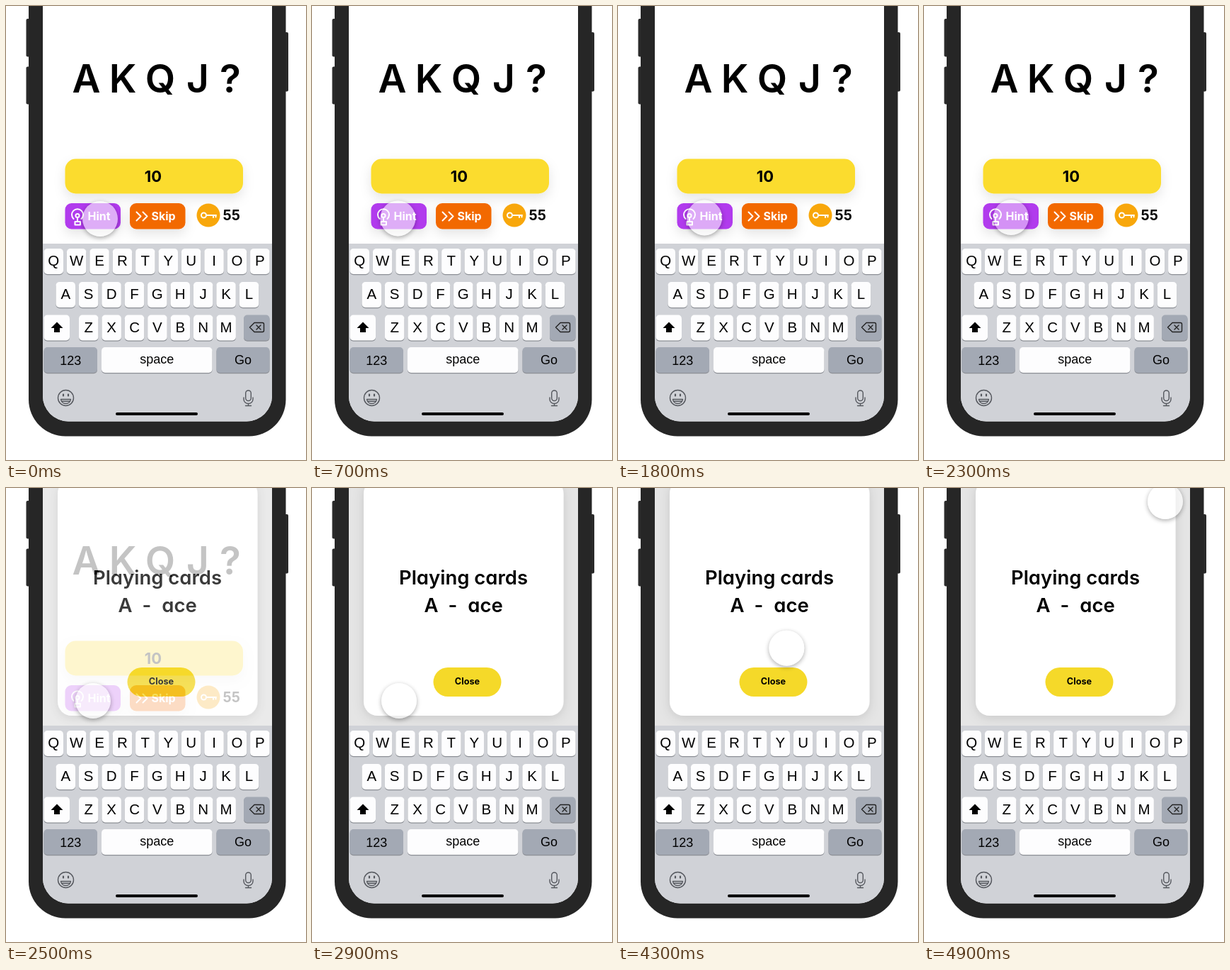
These frames come from a looping animation (424x640 px, 5 s). An HTML page:

```html
<!DOCTYPE html>
<html lang="en">
<head>
<meta charset="utf-8">
<title>Word puzzle hint</title>
<style>
html, body { margin: 0; width: 100%; height: 100%; overflow: hidden; background: #fff; }
#stage { position: absolute; left: 0; top: 0; width: 424px; height: 640px; overflow: hidden; }
svg { display: block; }
text { font-family: Inter, Lato, sans-serif; font-weight: 700; font-feature-settings: "cv11"; text-anchor: middle; }
.title text { font-size: 55px; font-weight: 600; }
.clue text { font-size: 27.5px; font-weight: 600; }
.label { fill: #fff; font-size: 16px; }
.icon { fill: none; stroke: #fff; stroke-width: 2; stroke-linecap: round; stroke-linejoin: round; }
.keys text { font-family: "Liberation Sans", Arial, sans-serif; font-weight: 400; font-size: 20.5px; }
.keys .word { font-size: 18px; }
.line { fill: none; stroke: #55585e; stroke-width: 1.4; stroke-linecap: round; stroke-linejoin: round; }
#touch {
  position: absolute; left: -25px; top: -25px; width: 50px; height: 50px; border-radius: 50%;
  box-shadow: 0 2px 6px rgba(0, 0, 0, .32);
}
</style>
</head>
<body>
<div id="stage">
<svg width="424" height="640" viewBox="0 0 424 640">
  <defs>
    <clipPath id="screen"><rect x="52" y="-60" width="324" height="645.5" rx="36"/></clipPath>
    <clipPath id="upper"><rect x="52" y="0" width="324" height="335"/></clipPath>
    <filter id="soft" x="-20%" y="-60%" width="140%" height="260%">
      <feDropShadow dx="0" dy="7" stdDeviation="8" flood-color="#000" flood-opacity=".1"/>
    </filter>
    <filter id="lift" x="-20%" y="-20%" width="140%" height="140%">
      <feDropShadow dx="0" dy="3" stdDeviation="8" flood-color="#000" flood-opacity=".13"/>
    </filter>
  </defs>

  <g fill="#2a2a2a">
    <rect x="28.5" y="18" width="8" height="53.5" rx="2"/>
    <rect x="28.5" y="85.5" width="8" height="53" rx="2"/>
    <rect x="390" y="37" width="9" height="83.5" rx="2"/>
  </g>
  <rect x="32" y="-80" width="363.5" height="686.5" rx="52" fill="#262626"/>

  <g clip-path="url(#screen)">
    <rect x="52" y="0" width="324" height="586" fill="#fff"/>
    <g class="title">
      <text x="113.5" y="122">A</text><text x="165" y="122">K</text>
      <text x="218" y="122">Q</text><text x="271" y="122">J</text>
      <text x="317" y="122">?</text>
    </g>

    <rect x="83.5" y="215.5" width="251.5" height="49" rx="15" fill="#fbdc2e" filter="url(#soft)"/>
    <text x="208" y="247.5" font-size="22">10</text>

    <g filter="url(#soft)">
      <rect x="83.5" y="278" width="78.5" height="36.5" rx="9" fill="#b13aed"/>
      <rect x="175" y="278" width="78.5" height="36.5" rx="9" fill="#f26904"/>
    </g>
    <g class="icon">
      <path d="M95.5 300A8 8 0 1 1 106.5 300"/>
      <circle cx="101" cy="295.5" r="2.6"/>
      <path d="M101 298.500V303M97.500 304h7.500v4.500h-7.500z"/>
      <path d="M184.500 290.500l6 6-6 6M193.500 290.500l6 6-6 6"/>
    </g>
    <text class="label" x="131.500" y="302">Hint</text>
    <text class="label" x="222.500" y="302">Skip</text>
    <circle cx="286" cy="295" r="16.500" fill="#f8a70b"/>
    <g class="icon">
      <circle cx="279.500" cy="295" r="3.500"/>
      <path d="M283.500 295H297M293 295.500v2.500M296.500 295.500v2"/>
    </g>
    <text x="318.700" y="302" font-size="19.500">55</text>

    <g id="popup" clip-path="url(#upper)" opacity="0">
      <rect x="52" y="0" width="324" height="335" fill="#e5e5e5"/>
      <rect x="73" y="-12" width="282.500" height="333" rx="20" fill="#fff" filter="url(#lift)"/>
      <g class="clue">
        <text x="214" y="136">Playing cards</text>
        <text x="168.500" y="175">A</text><text x="199" y="175">-</text><text x="245" y="175">ace</text>
      </g>
      <rect x="171.500" y="253" width="96" height="41" rx="20.500" fill="#f5d929"/>
      <text x="219.500" y="277" font-size="12.700">Close</text>
    </g>

    <rect x="52" y="335" width="324" height="251" fill="#d0d2d7"/>
    <g class="keys" id="keys"></g>
    <path d="M72 445.500l8.500 8.500h-4.500v6h-8v-6h-4.500z"/>
    <g class="line" style="stroke:#222">
      <path d="M351 446.500h11.500q2 0 2 2v9q0 2-2 2H351l-6.500-6.500zM354 450l6 6M360 450l-6 6"/>
    </g>
    <g class="line">
      <circle cx="84.500" cy="552.500" r="11"/>
      <path d="M77.500 554.500h14q-1 6-7 6t-7-6zM79 557.200h11"/>
      <path d="M81 547.500v2M88 547.500v2" stroke-width="2.200"/>
      <rect x="338.700" y="542" width="7.600" height="14.500" rx="3.800"/>
      <path d="M336 552v2.500a6.500 6 0 0 0 13 0V552M342.500 560.500v3M338.500 563.500h8"/>
    </g>
    <rect x="155" y="573" width="116" height="4" rx="2"/>
  </g>
</svg>
<div id="touch"></div>
</div>

<script>
const LOOP = 5000, STEP = 100;
const WHITE = '#fdfdfe', GREY = '#a3a9b4';

// time, x, y, opacity
const touchPath = [
  [0, 133, 300, .58], [300, 125, 300, .58], [600, 121.500, 299.500, .58],
  [1200, 121, 299, .58], [2200, 123, 298, .56], [2300, 123, 298, .44],
  [2500, 123, 300, .58], [3500, 123, 300, .6], [3600, 125, 299.500, .62],
  [3700, 133, 297.500, .64], [3800, 146, 293, .65], [3950, 173, 283, .65],
  [4100, 202, 266, .65], [4250, 230, 238, .65], [4400, 255, 201, .65],
  [4550, 278, 155, .65], [4700, 302, 101, .65], [4800, 319, 60, .65],
  [4900, 341, 19, .65]
];
// time, opacity
const popupFade = [[2300, 0], [2400, .05], [2500, .77], [2600, .96], [2700, 1]];

function key(x, y, w, label, fill = WHITE, cls = '', base = 24) {
  const box = (dy, color) =>
    `<rect x="${x}" y="${y + dy}" width="${w}" height="36" rx="5" fill="${color}"/>`;
  return box(1.2, '#8d9096') + box(0, fill) +
    `<text class="${cls}" x="${x + w / 2}" y="${y + base}">${label}</text>`;
}

function row(letters, x, y) {
  return [...letters].map((c, i) => key(x + i * 32.400, y, 27.500, c)).join('');
}

document.getElementById('keys').innerHTML =
  row('QWERTYUIOP', 53.500, 342) +
  row('ASDFGHJKL', 70.500, 389) +
  row('ZXCVBNM', 103, 435.500) +
  key(53.500, 435.500, 36.500, '') +
  key(336, 435.500, 36.500, '', GREY) +
  key(53.500, 481, 75.500, '123', GREY, 'word', 24.500) +
  key(135, 481, 156.500, 'space', WHITE, 'word', 23) +
  key(297.500, 481, 75, 'Go', GREY, 'word', 23.500);

function sample(table, t) {
  const next = table.findIndex(p => p[0] > t);
  if (next === 0) return table[0].slice(1);
  if (next < 0) return table[table.length - 1].slice(1);
  const a = table[next - 1], b = table[next];
  const k = (t - a[0]) / (b[0] - a[0]);
  return a.slice(1).map((v, i) => v + (b[i + 1] - v) * k);
}

const touch = document.getElementById('touch');
const popup = document.getElementById('popup');
const start = performance.now();

function draw(now) {
  const elapsed = Math.max(0, now - start) % LOOP;
  const t = Math.floor(elapsed / STEP) * STEP;
  const [x, y, alpha] = sample(touchPath, t);
  touch.style.transform = `translate(${x}px, ${y}px)`;
  touch.style.background = `rgba(255, 255, 255, ${alpha})`;
  popup.setAttribute('opacity', sample(popupFade, t)[0]);
  requestAnimationFrame(draw);
}
draw(start);
</script>
</body>
</html>
```
